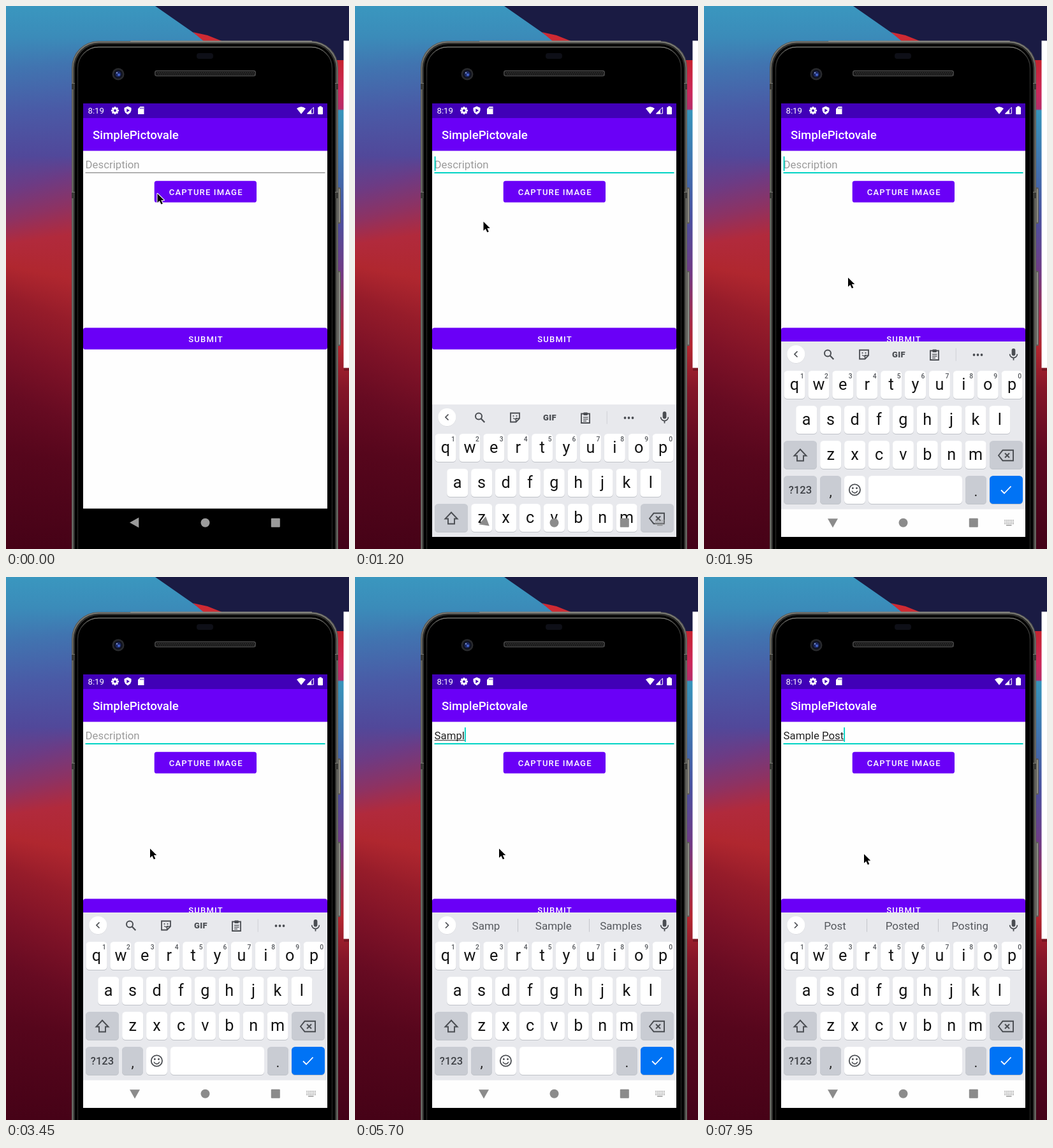
Animation, 538 px wide and 853 px high, one loop 8000 ms. Source, as an HTML page with a canvas:

```html
<!DOCTYPE html>
<html lang="en">
<head>
<meta charset="utf-8">
<title>Post composer</title>
<style>
html, body { margin: 0; width: 100%; height: 100%; overflow: hidden; background: #000; }
canvas { display: block; width: 538px; height: 853px; }
</style>
</head>
<body>
<canvas id="stage"></canvas>
<script>
const W = 538, H = 853, LOOP = 8000, STEP = 150;
const cv = document.getElementById('stage');
const dpr = window.devicePixelRatio || 1;
cv.width = W * dpr;
cv.height = H * dpr;
const c = cv.getContext('2d');
c.scale(dpr, dpr);

const PURPLE = '#6a00f7', TEAL = '#00d3c4', INK = '#4a4d52';

// time, typed text, start of the underlined word, suggestions
const typing = [
  [4950, 'S', 0, null],
  [5100, 'Sa', 0, ['S', 'So', 'She']],
  [5250, 'Sam', 0, ['Sa', 'Say', 'Sad']],
  [5400, 'Sam', 0, ['Sam', 'Same', 'Sand']],
  [5700, 'Sampl', 0, ['Samp', 'Sample', 'Samples']],
  [5850, 'Sampl', 0, ['Sampl', 'Sample', 'Samples']],
  [6000, 'Sample', 0, ['Sample', 'Samples', 'Sampler']],
  [6150, 'Sample ', 7, ['Sample', 'Samples', 'Sampler']],
  [6300, 'Sample ', 7, ['of', 'size', 'and']],
  [6750, 'Sample P', 7, ['of', 'size', 'and']],
  [6900, 'Sample P', 7, ['P', 'Paper', 'Pack']],
  [7050, 'Sample Po', 7, ['P', 'Paper', 'Pack']],
  [7200, 'Sample Po', 7, ['Po', 'Post', 'Pop']],
  [7500, 'Sample Pos', 7, ['Pos', 'Post', 'Posts']],
  [7650, 'Sample Post', 7, ['Post', 'Posted', 'Posting']]
];

const pointer = [
  [0, 237, 294], [150, 226, 268], [300, 209, 236], [450, 195, 217], [600, 187, 225],
  [750, 184, 242], [900, 183, 255], [1050, 183, 261], [1200, 201, 338],
  [1350, 225.5, 426], [7950, 250.5, 434.5]
];

const at = (list, t) => list.filter(e => e[0] <= t).pop();
const clamp = v => Math.max(0, Math.min(1, v));

function box(x, y, w, h, r, fill) {
  c.beginPath();
  c.roundRect(x, y, w, h, r);
  c.fillStyle = fill;
  c.fill();
}

function dot(x, y, r, fill) {
  c.beginPath();
  c.arc(x, y, r, 0, Math.PI * 2);
  c.fillStyle = fill;
  c.fill();
}

function trace(p, close) {
  c.beginPath();
  for (let i = 0; i < p.length; i += 2) c.lineTo(p[i], p[i + 1]);
  if (close) c.closePath();
}

function poly(p, fill) {
  trace(p, true);
  c.fillStyle = fill;
  c.fill();
}

function line(p, color, width, close) {
  trace(p, close);
  c.strokeStyle = color;
  c.lineWidth = width;
  c.stroke();
}

function ring(x, y, r, color, width, a = 0, b = Math.PI * 2) {
  c.beginPath();
  c.arc(x, y, r, a, b);
  c.strokeStyle = color;
  c.lineWidth = width;
  c.stroke();
}

function text(s, x, y, size, color, weight = 400, align = 'left', gap = 0) {
  c.font = `${weight} ${size}px Roboto, sans-serif`;
  c.letterSpacing = gap + 'px';
  c.textAlign = align;
  c.fillStyle = color;
  c.fillText(s, x, y);
  c.letterSpacing = '0px';
}

function vertical(y0, y1, stops) {
  const g = c.createLinearGradient(0, y0, 0, y1);
  stops.forEach(([y, color]) => g.addColorStop(clamp((y - y0) / (y1 - y0)), color));
  return g;
}

function wallpaper() {
  // y, slope, colour
  const bands = [
    [0, 0, '#3a97bf'], [50, 0, '#3b8bb9'], [100, -.1, '#4174b0'], [170, -.1, '#4a5aa6'],
    [235, 0, '#51489a'], [290, -.25, '#6d3b84'], [338, -.25, '#8e3262'], [374, -.15, '#b12a3c'],
    [408, .2, '#b0272f'], [455, .4, '#961c2a'], [530, .45, '#7e1227'], [610, .4, '#670b22'],
    [700, .2, '#56061c'], [853, 0, '#460217']
  ];
  for (let x = 0; x < 320; x += 2) {
    const k = Math.min(x, 110);
    c.fillStyle = vertical(0, H, bands.map(([y, s, col]) => [y + s * k, col]));
    c.fillRect(x, 0, 2, H);
  }
  c.fillStyle = vertical(85, H, [
    [85, '#c5232f'], [135, '#cb285a'], [162, '#b52d6a'], [164, '#3794ba'], [240, '#3f77b0'],
    [330, '#4a52a0'], [420, '#713a84'], [490, '#a32c4a'], [535, '#b3262f'], [600, '#851628'],
    [700, '#5d0820'], [853, '#430218']
  ]);
  c.fillRect(505, 85, 33, H - 85);
  poly([234, 0, W, 0, W, 85, 505, 85, 325, 60, 297, 44], '#1a1b43');
  poly([293, 41, 316, 46, 341, 56, 311, 56], '#cf2a33');
}

function phone() {
  // side buttons
  for (const [y, h] of [[285, 57], [416, 118]]) {
    box(518, y, 7, h, 2, '#5d5c58');
    box(522, y + 2, 1.5, h - 4, 1, '#9b9a94');
  }
  box(103, 55, 418, 840, 42, '#5a5a55');
  box(104.5, 56, 415, 840, 41, '#80807a');
  box(105.5, 57.5, 413, 840, 40, '#30302e');
  box(108, 60, 408, 840, 38, '#000');
  c.beginPath();
  c.roundRect(112.5, 64.5, 399, 840, 33);
  c.strokeStyle = vertical(64, 130, [[64, '#777772'], [80, '#3a3a38'], [130, '#252524']]);
  c.lineWidth = 1.3;
  c.stroke();
  box(195, 54.5, 285, 1.5, 1, '#85857e');
  for (const x of [103, 516]) {
    for (const y of [121, 292]) {
      box(x, y, 5, 10, 0, '#3a3a37');
      box(x, y, 5, 1, 0, '#777771');
    }
  }
  // camera, speaker, sensor
  dot(176, 107, 9.5, '#292a2d');
  dot(176, 107, 7, '#10131f');
  dot(176, 107, 4.5, '#1c2860');
  dot(177, 108, 2, '#4566cf');
  dot(174, 105, 1.2, '#8392c9');
  box(299, 74, 26, 9, 4, '#0e0f17');
  box(233, 101, 159, 9.5, 3.5, '#454545');
  box(234.5, 102.5, 156, 6.5, 2.5, '#171717');
  for (let x = 237; x < 389; x += 3) {
    box(x, 104, 1.5, 1.2, 0, '#3e3e3e');
    box(x + 1.5, 106.6, 1.5, 1.2, 0, '#3e3e3e');
  }
}

function statusBar() {
  box(121, 153, 383, 23, 0, '#4100b7');
  text('8:19', 128.5, 169, 13.2, '#fff');
  for (let i = 0; i < 8; i++) {
    c.save();
    c.translate(171, 164.2);
    c.rotate(i * Math.PI / 4);
    c.fillStyle = '#fff';
    c.fillRect(-1.4, -6, 2.8, 3);
    c.restore();
  }
  ring(171, 164.2, 3.3, '#fff', 2.6);
  poly([191, 157.5, 196.5, 160, 196.5, 164, 195, 167.5, 191, 170.5, 187, 167.5, 185.5, 164, 185.5, 160], '#fff');
  poly([189.3, 161.2, 189.3, 167, 194, 164.1], '#4100b7');
  poly([210.5, 158, 216.5, 158, 216.5, 170, 207, 170, 207, 161.5], '#fff');
  for (const x of [210.3, 212.4, 214.5]) box(x, 159.4, 1, 2.4, 0, '#4100b7');
  c.beginPath();
  c.moveTo(463, 169.8);
  c.lineTo(456, 161);
  c.quadraticCurveTo(463, 155.4, 470, 161);
  c.fillStyle = '#fff';
  c.fill();
  line([472.6, 169, 482.4, 169, 482.4, 159.2], '#fff', 1, true);
  poly([472, 169.5, 479, 162.5, 479, 169.5], '#fff');
  box(491.3, 157.4, 3.6, 3, 0, '#fff');
  box(489.2, 158.8, 7.8, 11.4, 1, '#fff');
}

function app(t, entry) {
  box(121, 153, 383, 637, 0, '#fefefe');
  statusBar();
  box(121, 176, 383, 51.5, 0, PURPLE);
  text('SimplePictovale', 136, 208.7, 18.7, '#fff', 500);

  const focus = t >= 900, typed = entry ? entry[1] : '';
  if (focus) box(124.5, 261, 376, 2, 0, TEAL);
  else box(124.5, 261.3, 376, 1.1, 0, '#858585');
  if (!typed) text('Description', 124.6, 254.6, 16.8, '#9b9b9b');
  else text(typed, 124.6, 254.6, 16.8, '#222');

  c.font = '400 16.8px Roboto, sans-serif';
  const end = 124.6 + c.measureText(typed).width;
  if (entry) {
    const from = 124.6 + c.measureText(typed.slice(0, entry[2])).width;
    box(from, 256, end - from, 1.1, 0, '#333');
  }
  if (entry || focus && (t - 900) % 1020 < 510) box(end, 236.3, 1.9, 22.7, 0, TEAL);

  box(232.7, 274.8, 160.3, 33.8, 3.7, PURPLE);
  text('CAPTURE IMAGE', 255.8, 297, 13.05, '#fff', 500, 'left', 1.16);
  box(121, 505.6, 383, 34, 3.7, PURPLE);
  text('SUBMIT', 286.3, 527.6, 13.05, '#fff', 500, 'left', 1.16);
}

function key(x, y, w, fill = '#fff') {
  box(x, y + 1, w, 44, 5.5, '#bfc2c8');
  box(x, y, w, 44, 5.5, fill);
}

function letters(row, x0, y, hints) {
  [...row].forEach((ch, i) => {
    const x = x0 + i * 37.9;
    key(x - 16.5, y, 33);
    text(ch, x, y + 30, 25.2, '#141414', 400, 'center');
    if (hints) text((i + 1) % 10, x + 12, y + 12, 10.3, '#55585d', 500, 'center');
  });
}

function tools() {
  line([146.5, 542.5, 142, 547, 146.5, 551.5], INK, 1.7);
  ring(194, 545.5, 5, INK, 2);
  line([197.5, 549, 203.3, 555], INK, 2.2);
  // sticker
  line([244, 540.5, 258, 540.5, 258, 549, 252.5, 554.5, 244, 554.5], INK, 1.8, true);
  line([258, 549, 252.5, 549, 252.5, 554.5], INK, 1.5);
  dot(248.5, 545, 1.1, INK);
  dot(253.5, 545, 1.1, INK);
  ring(251, 546.3, 3.3, INK, 1.3, .5, 2.6);
  text('GIF', 305.5, 551.8, 13, INK, 900, 'center', .4);
  // clipboard
  line([355, 541.5, 368, 541.5, 368, 556, 355, 556], INK, 1.8, true);
  box(358.3, 539.5, 6.6, 4.5, 1, INK);
  [546.5, 549.4, 552.3].forEach((y, i) => box(358, y, i < 2 ? 7.5 : 5, 1.3, 0, INK));
  box(394.7, 537.5, 1, 20, 0, '#cfd1d6');
  for (const x of [423.5, 429.5, 435.5]) dot(x, 548, 1.9, INK);
}

function suggestions(words) {
  line([142, 542.5, 146.5, 547, 142, 551.5], INK, 1.7);
  words.forEach((w, i) => text(w, 205.5 + i * 105.8, 553.6, 17, '#55585d', 400, 'center'));
  for (const x of [255, 367]) box(x, 537, 1, 20.5, 0, '#c4c6cb');
}

function keyboard(drop, words) {
  const grey = '#c9ccd3';
  c.save();
  c.beginPath();
  c.rect(121, 527, 383, 307);
  c.clip();
  c.translate(0, drop);
  box(121, 527, 383, 264, 0, '#e8e9ed');
  box(121, 790.5, 383, 44, 0, '#fefefe');

  dot(144.3, 547.7, 14, '#d3d5d9');
  dot(144.3, 547, 14, '#fff');
  if (words) suggestions(words);
  else tools();
  box(482.6, 538, 5.8, 11.5, 2.9, INK);
  ring(485.5, 546.8, 5.9, INK, 1.7, 0, Math.PI);
  line([485.5, 552.5, 485.5, 556.5], INK, 1.8);

  letters('qwertyuiop', 142, 573, true);
  letters('asdfghjkl', 160.7, 628);
  letters('zxcvbnm', 198.7, 683);
  key(125, 683, 52, grey);
  line([151, 696.5, 160.5, 706.5, 156, 706.5, 156, 714.5, 146, 714.5, 146, 706.5, 141.5, 706.5], INK, 1.9, true);
  key(448, 683, 52, grey);
  line([462, 706, 468.5, 697.8, 485, 697.8, 485, 714.2, 468.5, 714.2], INK, 1.9, true);
  line([472, 702.5, 479, 709.5], INK, 1.9);
  line([479, 702.5, 472, 709.5], INK, 1.9);

  key(125, 738, 52, grey);
  text('?123', 151, 765.8, 16.6, '#3f4247', 500, 'center');
  key(182, 738, 33, grey);
  text(',', 198.7, 770, 22, '#222', 400, 'center');
  key(220, 738, 33);
  ring(236.4, 760, 8.6, INK, 1.8);
  dot(233.3, 757.5, 1.4, INK);
  dot(239.5, 757.5, 1.4, INK);
  ring(236.4, 760.5, 4.4, INK, 1.7, .25, Math.PI - .25);
  key(258, 738, 147);
  key(410, 738, 33, grey);
  text('.', 426.3, 770, 22, '#222', 400, 'center');
  key(448, 738, 52, '#0073f5');
  line([466, 760.5, 471, 765.5, 481.5, 754.5], '#fff', 1.8);
  c.restore();
}

function navIcons(t) {
  const grey = t >= 1200 ? '#8b8b8b' : '#9b9b9b';
  const u = clamp((t - 1100) / 320);
  c.save();
  c.translate(202, 811.5);
  c.rotate(-Math.PI / 2 * u * u * (3 - 2 * u));
  poly([-8, 0, 6.3, -8, 6.3, 8], grey);
  c.restore();
  dot(312.5, 811.8, 7, grey);
  box(415.8, 804.8, 14, 14, 1, grey);
  if (t < 1050) return;
  for (let i = 0; i < 6; i++) {
    for (const y of [807.3, 809.9, 812.5]) box(471.3 + i * 2.6, y, 1.5, 1.4, 0, '#909090');
  }
  box(474, 815, 8.5, 1.4, 0, '#909090');
}

function arrow(x, y) {
  c.save();
  c.translate(x, y);
  c.lineJoin = 'round';
  const p = [.5, .8, .5, 15, 3.8, 11.9, 6.4, 17.6, 8.8, 16.5, 6.3, 11, 10.8, 11];
  line(p, '#fff', 2.2, true);
  poly(p, '#000');
  c.restore();
}

function draw(t) {
  const entry = at(typing, t);
  wallpaper();
  phone();
  // window behind the phone, with a soft edge below
  box(530, 568, 8, 5, 0, 'rgba(20,0,8,.25)');
  box(529.5, 54.5, 9, 514, 0, '#fff');
  app(t, entry);
  box(121, 789.5, 383, 45, 0, '#000');
  if (t >= 1200) {
    const left = 1 - clamp((t - 1110) / 285);
    keyboard(Math.round(308 * left ** 3), entry && entry[3]);
  }
  navIcons(t);
  const [, x, y] = at(pointer, t);
  arrow(x, y);
}

let shown = -1;
const start = performance.now();
function tick() {
  const t = Math.floor((performance.now() - start) % LOOP / STEP) * STEP;
  if (t !== shown) draw(shown = t);
  requestAnimationFrame(tick);
}
tick();
</script>
</body>
</html>
```
